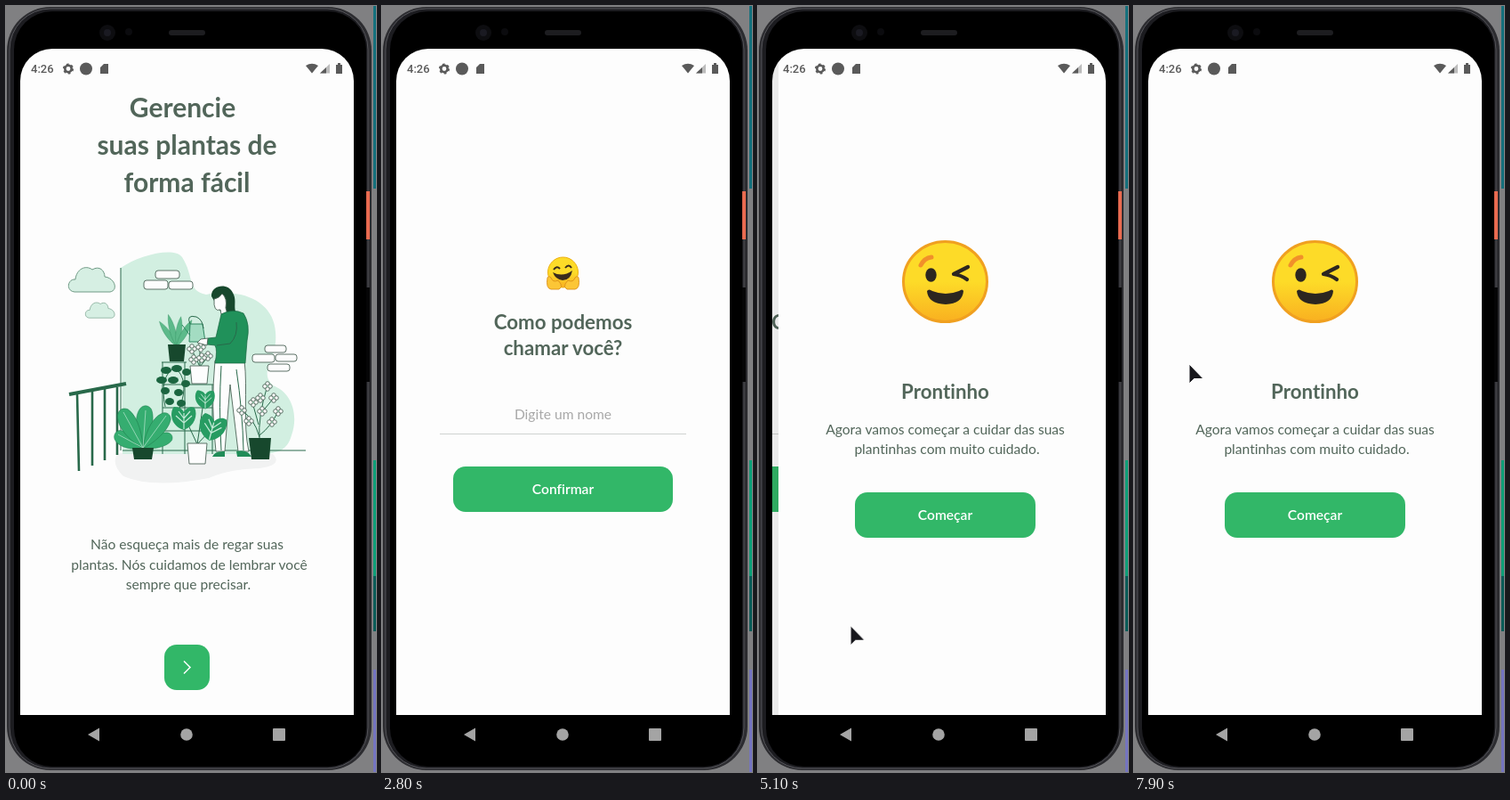
An HTML page for the animation above (8000 ms loop, 416 by 860 pixels).

```html
<!DOCTYPE html>
<html lang="pt-BR">
<head>
<meta charset="utf-8">
<title>Plantas</title>
<style>
  @property --p1 { syntax: "<number>"; inherits: true; initial-value: 1; }
  @property --p2 { syntax: "<number>"; inherits: true; initial-value: 1; }

  html, body { margin: 0; width: 100%; height: 100%; overflow: hidden; background: #000; }

  svg {
    display: block; width: 416px; height: 860px;
    font-family: Lato, sans-serif; font-variant-ligatures: none; fill: #52665a;
    animation: push1 8s linear infinite, push2 8s linear infinite;
  }

  /* p1 and p2: how far the second and third page still are from their place */
  @keyframes push1 {
    0%, 28.75% { --p1: 1; }
    30% { --p1: .72; }
    31.25% { --p1: .34; }
    32.5% { --p1: .12; }
    33.75% { --p1: .03; }
    35%, 100% { --p1: 0; }
  }
  @keyframes push2 {
    0%, 56.25% { --p2: 1; }
    57.5% { --p2: .72; }
    58.75% { --p2: .36; }
    60% { --p2: .16; }
    61.25% { --p2: .075; }
    62.5% { --p2: .035; }
    63.75% { --p2: .0187; }
    68.75% { --p2: .0067; }
    73.75%, 100% { --p2: 0; }
  }
  #start { transform: translateX(calc((var(--p1) - 1) * 112.5px)); }
  #name  { transform: translateX(calc(var(--p1) * 375px + (var(--p2) - 1) * 112.5px)); }
  #done  { transform: translateX(calc(var(--p2) * 375px)); }

  .page { fill: #fdfdfd; }
  .shade { fill: #ededed; mix-blend-mode: multiply; }
  #start .shade { opacity: calc(1 - var(--p1)); }
  #name .shade { opacity: calc(1 - var(--p2)); }

  text { text-anchor: middle; font-size: 15.6px; }
  .h1 { font-size: 30px; font-weight: 700; }
  .h2 { font-size: 22.3px; font-weight: 700; }
  .hint { fill: #a8a8a8; }
  .btn { fill: #32b768; }
  .label { fill: #fff; font-weight: 600; }
  .clock { font: 500 13px Roboto, sans-serif; text-anchor: start; fill: #5a5a5a; }

  #cursor { fill: #17171c; stroke: #fff; stroke-width: 1; animation: point 8s linear infinite; }
  @keyframes point {
    0%, 17.5% { transform: translate(430px, 810px); }
    20% { transform: translate(340px, 790px); }
    23.75% { transform: translate(204px, 745px); }
    27.5%, 31.24% { transform: translate(198px, 737px); }
    31.25%, 46.24% { transform: translate(-40px, -40px); }
    46.25% { transform: translate(160px, 650px); }
    50% { transform: translate(141px, 591px); }
    53.75%, 56.25% { transform: translate(150px, 552px); }
    63.75% { transform: translate(104px, 696px); }
    68.75% { transform: translate(115px, 591px); }
    78.75% { transform: translate(118px, 582px); }
    85% { transform: translate(150px, 300px); }
    90% { transform: translate(110px, 450px); }
    95%, 96.25% { transform: translate(18px, 404px); }
    98.75%, 100% { transform: translate(62px, 402px); }
  }

  .line { fill: none; stroke: #28694a; stroke-width: 1; }
  .dark { fill: #17482d; }
  .vine { fill: #1b6540; }
  .white { fill: #fdfdfd; stroke: #4c6457; stroke-width: .9; }
</style>
</head>
<body>
<svg viewBox="0 0 416 860">
  <defs>
    <clipPath id="screen"><path d="M16 796V84a36 36 0 0 1 36-36H355a36 36 0 0 1 36 36V796Z"/></clipPath>
    <linearGradient id="face" x2="0" y2="1">
      <stop offset=".5" stop-color="#fddb28"/><stop offset="1" stop-color="#f9b020"/>
    </linearGradient>
    <path id="leaf" d="M0 0C-9 -10 -10 -27 0 -40C10 -27 9 -10 0 0Z"/>
    <path id="broad" d="M0 0C-7 -9 -16 -28 -7 -39C-3 -43 3 -43 7 -39C14 -28 6 -9 0 0Z"/>
    <g id="flower" class="white">
      <circle cy="-3" r="2.3"/><circle cx="3" r="2.3"/><circle cy="3" r="2.3"/><circle cx="-3" r="2.3"/>
      <circle r="1" fill="#8fc4a8" stroke="none"/>
    </g>
    <g id="heart">
      <path d="M0 13C-16 8 -16 -8 -11 -13C-5 -13 -1 -10 0 -7C2 -11 7 -14 12 -12C16 -4 12 9 0 13Z" fill="#279c62"/>
      <path d="M0 12V-6M0 5L-9 -3M0 5L9 -3M0 0L-6 -8M0 0L7 -8" fill="none" stroke="#c2ead6" stroke-width="1.2"/>
    </g>
  </defs>

  <!-- phone body -->
  <rect width="416" height="860" fill="#808082"/>
  <path d="M413 0h3v205h-3z" fill="#14707c"/>
  <path d="M413 510h3v130h-3z" fill="#0e9f78"/>
  <path d="M413 640h3v62h-3z" fill="#0a5c58"/>
  <path d="M413 745h3v115h-3z" fill="#7474c0"/>
  <rect x="1" y="1" width="410" height="857" rx="49" fill="#2c2c30"/>
  <rect x="4" y="3" width="403" height="853" rx="46" fill="#1c1c20" stroke="#55555a"/>
  <rect x="9" y="6" width="396" height="848" rx="43" fill="#000"/>
  <rect x="405" y="208" width="4" height="54" fill="#e86a50"/>
  <rect x="405" y="316" width="4" height="106" fill="#050506"/>
  <rect x="183" y="27" width="41" height="6" rx="3" fill="#1d1d20"/>
  <circle cx="114" cy="30" r="9" fill="#0d0d10"/><circle cx="114" cy="30" r="4" fill="#1a1a22"/>
  <circle cx="138" cy="29" r="4" fill="#0b0b0e"/>

  <g clip-path="url(#screen)">
    <g id="start">
      <rect class="page" x="16" y="48" width="375" height="748"/>
      <text class="h1" x="198.500" y="125">Gerencie</text>
      <text class="h1" x="203.500" y="167">suas plantas de</text>
      <text class="h1" x="203.500" y="209">forma fácil</text>

      <!-- wall and floor -->
      <path d="M125 503Q170 493 300 503Q312 515 285 519Q250 520 228 530Q165 542 132 528Q118 514 125 503Z" fill="#f1f2f2"/>
      <path d="M129 294C150 279 190 270 198 282C212 304 203 319 225 324C268 316 301 333 303 366C306 400 283 409 300 426C322 434 329 460 321 482C316 501 302 503 282 503H131Z" fill="#d2efe1"/>
      <path class="line" d="M129 294V499M131 499H337" stroke="#62786c"/>
      <g fill="#d6efe3" stroke="#6f9a85">
        <path id="cloud" d="M77 321C67 320 69 306 78 307C79 296 89 290 97 296C105 291 111 297 111 304C122 305 127 319 117 321Z"/>
        <use href="#cloud" transform="translate(45 148) scale(.63)"/>
      </g>
      <g class="white">
        <rect x="168" y="297" width="27" height="9" rx="3"/><rect x="155" y="308" width="27" height="10" rx="3"/>
        <rect x="183" y="309" width="27" height="9" rx="3"/><rect x="291" y="381" width="24" height="8" rx="3"/>
        <rect x="277" y="391" width="25" height="9" rx="3"/><rect x="303" y="391" width="24" height="8" rx="3"/>
        <rect x="294" y="402" width="25" height="8" rx="3"/>
      </g>
      <g class="line" stroke="#1c5238">
        <path d="M71 436L135 424" stroke-width="4"/>
        <path d="M80 436L82 522M97 433V516M111 430V510M125 428V504" stroke-width="2.600"/>
      </g>

      <!-- shelf -->
      <g class="line" stroke="#28784f" stroke-width="2">
        <path d="M176 400V503M201 400V503M232 425V503M175 400H203M176 425H234M176 451H232M176 477H232"/>
      </g>
      <g fill="#5cba8a" stroke="#2b8859" stroke-width=".5">
        <use href="#leaf" transform="translate(192 382) rotate(-35) scale(.45 .85)"/>
        <use href="#leaf" transform="translate(192 382) rotate(-15) scale(.45 .92)"/>
        <use href="#leaf" transform="translate(192 382) rotate(8) scale(.45 .84)"/>
        <use href="#leaf" transform="translate(192 382) rotate(30) scale(.45 .85)"/>
      </g>
      <path class="dark" d="M182 380h20l-2 19h-16z"/>
      <path d="M207 357h14l3 20h-18zM207 370L198 358" fill="#a3dcc2" stroke="#2e8660"/>
      <path class="line" d="M207 357Q202 346 214 349Q221 352 222 362"/>
      <path class="line" d="M218 405L209 386M218 405V384M218 405L227 394"/>
      <use href="#flower" x="209" y="385"/><use href="#flower" x="219" y="383"/>
      <use href="#flower" x="227" y="393"/><use href="#flower" x="211" y="397"/><use href="#flower" x="220" y="395"/>
      <path class="white" d="M207 404h21l-2 20h-17z"/>

      <!-- trailing plant -->
      <path class="line" d="M190 406Q172 415 179 450M190 406Q207 420 195 452"/>
      <g class="vine">
        <ellipse cx="180" cy="409" rx="6" ry="4"/><ellipse cx="192" cy="407" rx="6" ry="4"/><ellipse cx="203" cy="411" rx="5" ry="4"/>
        <ellipse cx="175" cy="420" rx="6" ry="4"/><ellipse cx="188" cy="420" rx="6" ry="4"/><ellipse cx="202" cy="424" rx="5" ry="4"/>
        <ellipse cx="179" cy="432" rx="5" ry="4"/><ellipse cx="194" cy="434" rx="5" ry="4"/><ellipse cx="184" cy="444" rx="5" ry="4"/>
        <ellipse cx="197" cy="446" rx="5" ry="4"/>
      </g>

      <!-- floor plants -->
      <g fill="#35ad70" stroke="#1d7c4c" stroke-width=".5">
        <use href="#broad" transform="translate(154 497) rotate(-62) scale(.8 .85)"/>
        <use href="#broad" transform="translate(154 497) rotate(66) scale(.7 .85)"/>
        <use href="#broad" transform="translate(154 497) rotate(4) scale(.9 1.150)"/>
        <use href="#broad" transform="translate(154 497) rotate(-29) scale(.95 1.200)"/>
        <use href="#broad" transform="translate(154 497) rotate(36) scale(.85 1.150)"/>
      </g>
      <path d="M154 496L126 481M154 496L132 456M154 496L157 454M154 496L180 460" fill="none" stroke="#aadfc4" stroke-width=".8"/>
      <path class="dark" d="M142 496h24l-2 13h-20z"/>
      <path class="line" d="M215 492L201 462M215 492L222 445M215 492L232 474"/>
      <use href="#heart" x="200" y="463"/>
      <path class="white" d="M204 491h22l-2 23h-18z"/>

      <!-- gardener -->
      <path class="white" d="M235 398H268C272 430 266 470 273 500H261L252 425L246 500H236Q230 450 235 398Z"/>
      <path class="line" d="M259 408Q266 455 267 499M242 404Q239 450 242 499" stroke="#8a968f" stroke-width=".7"/>
      <path d="M232 506Q235 499 246 500V506ZM259 500Q271 497 276 506H260Z" fill="#218c58"/>
      <path class="dark" d="M231 326C230 313 250 310 255 322C260 330 255 338 259 345C252 350 243 347 240 341Z"/>
      <path class="white" d="M234 329Q240 328 243 323Q249 328 247 339L249 346H242L241 341Q233 344 234 329Z"/>
      <path d="M242 346Q255 339 267 345Q275 357 271 376L269 401H235Q238 386 235 381L226 380L227 373L236 372Z" fill="#20915a" stroke="#17653f" stroke-width=".7"/>
      <path class="line" d="M259 355Q261 370 252 379L237 381" stroke="#155f3b"/>
      <path class="white" d="M227 373L219 374L215 378L226 381Z"/>
      <use href="#heart" transform="translate(224 442) scale(.8)"/>
      <use href="#heart" transform="translate(232 474) rotate(15) scale(1.100)"/>

      <!-- blossom tree -->
      <path class="line" d="M285 487Q283 461 294 426M285 484Q279 462 264 454M285 482Q298 472 306 455M284 470L277 445M287 457L301 440"/>
      <use href="#flower" x="294" y="427"/><use href="#flower" x="301" y="440"/><use href="#flower" x="278" y="445"/>
      <use href="#flower" x="265" y="454"/><use href="#flower" x="306" y="455"/><use href="#flower" x="288" y="455"/>
      <use href="#flower" x="273" y="466"/><use href="#flower" x="299" y="467"/><use href="#flower" x="286" y="440"/>
      <path class="dark" d="M273 485h25l-2 24h-20z"/>

      <text x="203.500" y="610">Não esqueça mais de regar suas</text>
      <text x="206" y="633">plantas. Nós cuidamos de lembrar você</text>
      <text x="205" y="655">sempre que precisar.</text>
      <rect class="btn" x="178" y="717" width="51" height="51" rx="14"/>
      <path d="M200 735.500L207 742.500L200 749.500" fill="none" stroke="#fff" stroke-width="1.500"/>
      <rect class="shade" x="16" y="48" width="375" height="748"/>
    </g>

    <g id="name">
      <rect class="page" x="16" y="48" width="375" height="748"/>
      <circle cx="203.500" cy="299" r="17" fill="url(#face)" stroke="#eeb012"/>
      <path d="M193 296q3.500 -5 7 -1M206 294q4 -5 7 0" fill="none" stroke="#3a2c1c" stroke-width="2"/>
      <path d="M192 299Q203 305 214 297Q212 308 203 308Q195 307 192 299Z" fill="#3a2c1c"/>
      <g fill="#fcc636" stroke="#dc9018" stroke-width=".9">
        <path id="hand" d="M186 305Q184 317 190 318H199Q203 316 201 312L198 308Q192 311 190 305Q187 302 186 305Z"/>
        <use href="#hand" transform="matrix(-1 0 0 1 407 0)"/>
      </g>
      <text class="h2" x="203.500" y="363">Como podemos</text>
      <text class="h2" x="203.500" y="392">chamar você?</text>
      <text class="hint" x="203.500" y="464">Digite um nome</text>
      <path d="M65 480.500H342" stroke="#cfd2d0"/>
      <rect class="btn" x="80" y="517" width="247" height="51" rx="14"/>
      <text class="label" x="203.500" y="548">Confirmar</text>
      <rect class="shade" x="16" y="48" width="375" height="748"/>
    </g>

    <g id="done">
      <rect class="page" x="16" y="48" width="375" height="748"/>
      <ellipse cx="203.500" cy="309.500" rx="47" ry="45" fill="url(#face)" stroke="#f0a020" stroke-width="3"/>
      <path d="M176 291Q180 283 188 282" fill="none" stroke="#f1902a" stroke-width="5" stroke-linecap="round"/>
      <ellipse cx="187.500" cy="302" rx="6.200" ry="7.700" fill="#2c2620"/>
      <path d="M229 293L213 301Q221 302 228 307" fill="none" stroke="#2c2620" stroke-width="4.200" stroke-linecap="round" stroke-linejoin="round"/>
      <path d="M183 320Q185 317 189 320Q204 326 219 320Q223 317 224 320Q223 334 204 335Q184 334 183 320Z" fill="#2c2620"/>
      <text class="h2" x="203.500" y="441">Prontinho</text>
      <text x="203.500" y="481">Agora vamos começar a cuidar das suas</text>
      <text x="205.500" y="503">plantinhas com muito cuidado.</text>
      <rect class="btn" x="102" y="546" width="203" height="51" rx="14"/>
      <text class="label" x="203.500" y="577">Começar</text>
    </g>

    <!-- status bar -->
    <g fill="#5a5a5a">
      <text class="clock" x="28" y="75">4:26</text>
      <circle cx="70" cy="70.500" r="3.700" fill="none" stroke="#5a5a5a" stroke-width="2.600"/>
      <circle cx="70" cy="70.500" r="5.100" fill="none" stroke="#5a5a5a" stroke-width="2" stroke-dasharray="2.670"/>
      <circle cx="90" cy="70.500" r="7"/>
      <path d="M106 69l4-4h5v11h-9z"/>
      <path d="M337 67Q344 62.500 351 67L344 75.500Z"/>
      <path d="M353 75.500L364 65V75.500Z" opacity=".4"/><path d="M353 75.500L360 69V75.500Z"/>
      <path d="M371 66h2v-2h3v2h2v10h-7z"/>
    </g>
  </g>

  <!-- navigation bar -->
  <g fill="#a4a4a4">
    <path d="M92 818L105 810.500V825.500Z"/>
    <circle cx="203" cy="818" r="6.800"/>
    <rect x="300" y="811" width="14" height="14" rx="1"/>
  </g>

  <path id="cursor" d="M0 0V22L5.500 16.500H16Z"/>
</svg>
</body>
</html>
```
